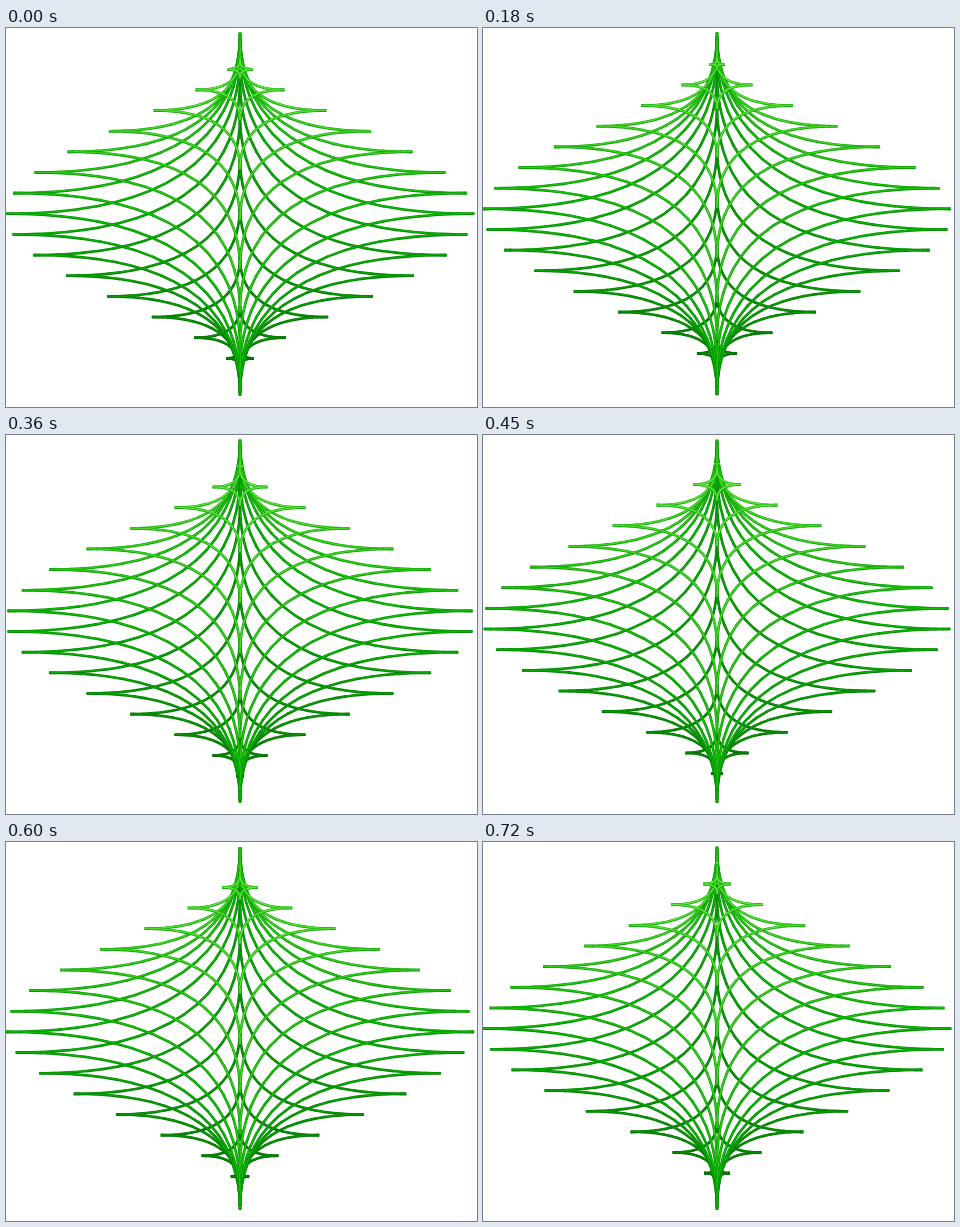
Recreate the animation shown at these times as an HTML page with a canvas. Size 471 by 379 pixels, loop 750 ms.

```html
<!DOCTYPE html>
<html>
<head>
<meta charset="utf-8">
<style>
html, body { margin: 0; width: 100%; height: 100%; overflow: hidden; background: #fff; }
canvas { display: block; }
</style>
</head>
<body>
<canvas id="stage" width="471" height="379"></canvas>
<script>
const ctx = document.getElementById('stage').getContext('2d');
const STEP_MS = 30, STEPS = 25;
const CX = 234, CY = 186.2;
const WIDTH = 234, DEPTH = 159.2, RISE = 165.2;
const LEVELS = 8, PIECES = 26;

// Tilted slices of the solid sqrt|x| + sqrt|y| + z^2 = 1
function buildSegments(phase) {
  const segments = [];
  for (let k = -LEVELS; k <= LEVELS; k++) {
    const z = (phase - k) / LEVELS;
    if (Math.abs(z) >= 1) continue;
    const size = (1 - z * z) ** 2;
    for (const sx of [-1, 1]) for (const sy of [-1, 1]) {
      let last = null;
      for (let i = 0; i <= PIECES; i++) {
        const a = i / PIECES * Math.PI / 2;
        const front = sy * size * Math.sin(a) ** 4;
        const point = {
          x: CX + sx * WIDTH * size * Math.cos(a) ** 4,
          y: CY - RISE * z + DEPTH * front,
          near: z + front,
          light: z + 0.2 * front
        };
        if (last) segments.push({ p: last, q: point });
        last = point;
      }
    }
  }
  return segments.sort((a, b) => a.p.near + a.q.near - b.p.near - b.q.near);
}

function stroke(p, q, width, lift, color) {
  const dx = q.x - p.x, dy = q.y - p.y;
  const overlap = 0.35 / (Math.hypot(dx, dy) || 1);
  ctx.lineWidth = width;
  ctx.strokeStyle = color;
  ctx.beginPath();
  ctx.moveTo(p.x - dx * overlap, p.y - dy * overlap - lift);
  ctx.lineTo(q.x + dx * overlap, q.y + dy * overlap - lift);
  ctx.stroke();
}

function draw(phase) {
  ctx.fillStyle = '#fff';
  ctx.fillRect(0, 0, 471, 379);
  for (const { p, q } of buildSegments(phase)) {
    const light = (p.light + q.light) / 2;
    const glow = Math.max(0, light);
    stroke(p, q, 2.6, 0, `rgb(${20 * glow}, ${140 + 42 * light}, ${10 * glow})`);
    stroke(p, q, 1.3, 0.2, `rgb(${10 + 130 * glow}, ${188 + 62 * light}, ${4 + 95 * glow ** 1.5})`);
  }
}

let shown = -1;
function tick() {
  const step = Math.floor(performance.now() / STEP_MS + 0.1) % STEPS;
  if (step !== shown) {
    shown = step;
    draw((step + 0.5) / STEPS);
  }
  requestAnimationFrame(tick);
}
tick();
</script>
</body>
</html>
```
